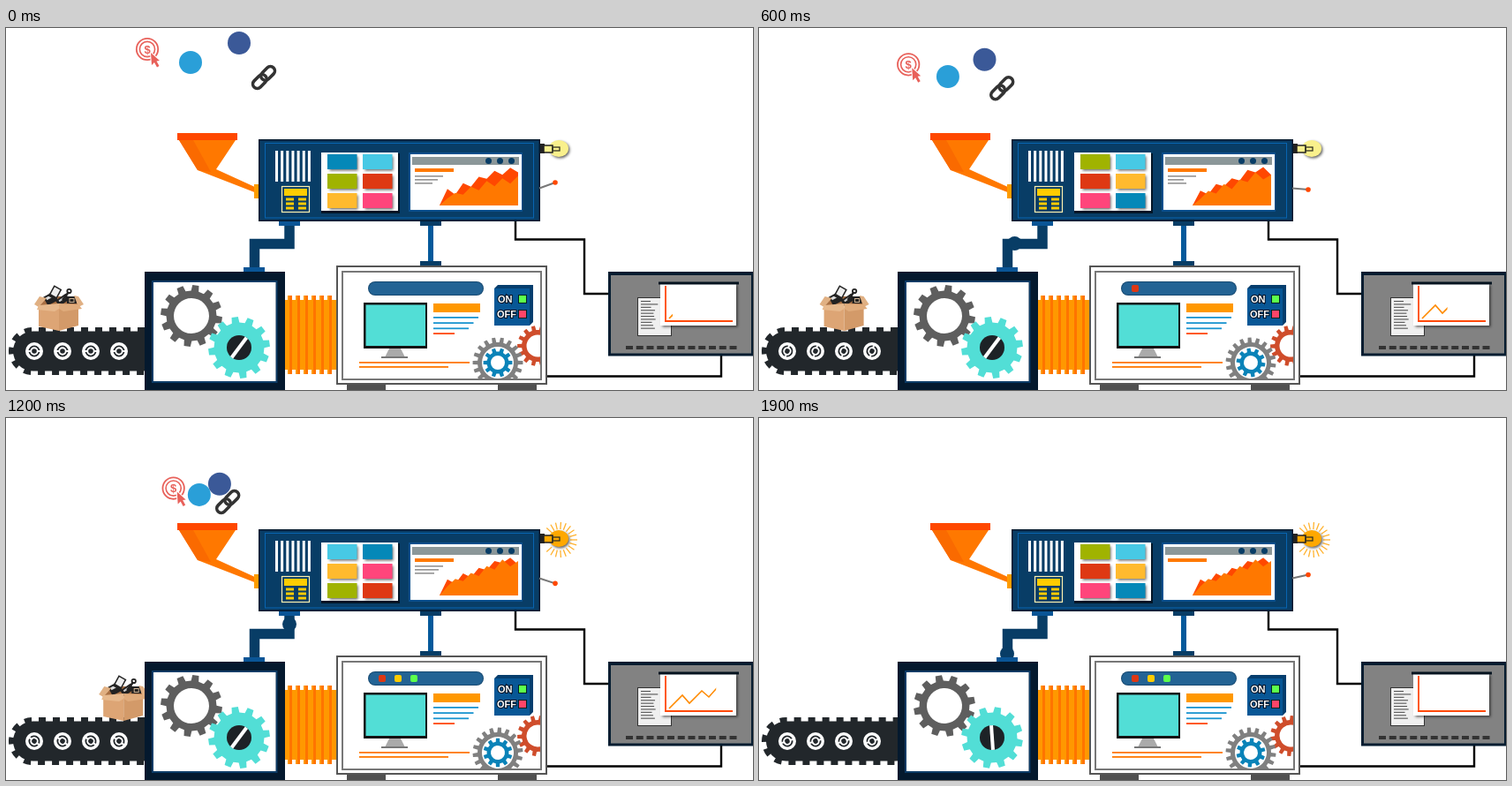
An HTML page with a canvas for the animation above (2 s loop, 846x410 px).

```html
<!DOCTYPE html>
<html lang="en">
<head>
<meta charset="utf-8">
<title>Content machine</title>
<style>
html, body { margin: 0; width: 100%; height: 100%; overflow: hidden; background: #fff; }
canvas { display: block; }
</style>
</head>
<body>
<canvas id="stage" width="846" height="410"></canvas>
<script>
const ctx = document.getElementById('stage').getContext('2d');
const NAVY = '#04192e', BLUE = '#083d66', ORANGE = '#ff7800', RED = '#ff4800';

// Drawing helpers
function rect(x, y, w, h, color) {
  ctx.fillStyle = color;
  ctx.fillRect(x, y, w, h);
}
function frame(x, y, w, h, color, width) {
  ctx.strokeStyle = color;
  ctx.lineWidth = width;
  ctx.strokeRect(x, y, w, h);
}
function pill(x, y, w, h, r, color) {
  ctx.fillStyle = color;
  ctx.beginPath();
  ctx.roundRect(x, y, w, h, r);
  ctx.fill();
}
function disc(x, y, r, color) {
  ctx.fillStyle = color;
  ctx.beginPath();
  ctx.arc(x, y, r, 0, 7);
  ctx.fill();
}
function ring(x, y, r, color, width) {
  ctx.strokeStyle = color;
  ctx.lineWidth = width;
  ctx.beginPath();
  ctx.arc(x, y, r, 0, 7);
  ctx.stroke();
}
function trace(points) {
  ctx.beginPath();
  points.forEach(([x, y]) => ctx.lineTo(x, y));
}
function poly(points, color) {
  trace(points);
  ctx.fillStyle = color;
  ctx.fill();
}
function line(points, color, width) {
  trace(points);
  ctx.strokeStyle = color;
  ctx.lineWidth = width;
  ctx.stroke();
}
function at(x, y, angle, draw) {
  ctx.save();
  ctx.translate(x, y);
  ctx.rotate(angle);
  draw();
  ctx.restore();
}
function clipped(x, y, w, h, draw) {
  ctx.save();
  ctx.beginPath();
  ctx.rect(x, y, w, h);
  ctx.clip();
  draw();
  ctx.restore();
}
function shadowed(draw) {
  ctx.save();
  ctx.shadowColor = 'rgba(0,0,0,.6)';
  ctx.shadowBlur = 3;
  ctx.shadowOffsetX = ctx.shadowOffsetY = 1.5;
  draw();
  ctx.restore();
}
function gear(x, y, outer, root, hole, teeth, angle, color) {
  at(x, y, angle, () => {
    const pitch = 2 * Math.PI / teeth;
    ctx.beginPath();
    for (let i = 0; i < teeth; i++) {
      [[-.29, root], [-.2, outer], [.2, outer], [.29, root]].forEach(([k, r]) => {
        const a = (i + k) * pitch;
        ctx.lineTo(r * Math.cos(a), r * Math.sin(a));
      });
    }
    ctx.closePath();
    if (hole) {
      ctx.moveTo(hole, 0);
      ctx.arc(0, 0, hole, 0, 7);
    }
    ctx.fillStyle = color;
    ctx.fill('evenodd');
  });
}
function noise(seed) {
  const v = Math.sin(seed * 12.9898) * 43758.5453;
  return v - Math.floor(v);
}

// Falling icons: position = start + v * n + a * n²
const fall = (start, v, a, n) => start + v * n + a * n * n;

function clickIcon(x, y) {
  const red = '#e8615a';
  ring(x, y, 12.2, red, 1.8);
  ring(x, y, 8.6, red, 1.6);
  ctx.fillStyle = red;
  ctx.font = 'bold 13px "Liberation Sans", Arial, sans-serif';
  ctx.textAlign = 'center';
  ctx.fillText('$', x, y + 4.7);
  ctx.textAlign = 'left';
  const cursor = [[4, 4], [14, 13], [10.5, 13.5], [13.5, 19], [11, 20.5], [8, 15], [5, 18]]
    .map(([dx, dy]) => [x + dx, y + dy]);
  line([...cursor, cursor[0]], '#fff', 2);
  poly(cursor, red);
}
function linkIcon(x, y) {
  at(x, y, -Math.PI / 4, () => {
    ctx.strokeStyle = '#333';
    ctx.lineWidth = 3.6;
    [-15.5, -2.5].forEach(left => {
      ctx.beginPath();
      ctx.roundRect(left, -5, 18, 10, 5);
      ctx.stroke();
    });
  });
}
function icons(n) {
  clipped(0, 0, 846, 120, () => {
    disc(fall(264, -1, -.07, n), fall(17, 1.45, .28, n), 13, '#3b5998');
    disc(fall(209, .82, 0, n), fall(39, 1.35, .22, n), 13, '#2a9fd8');
    clickIcon(fall(160, .6, .156, n), fall(24, 1.15, .29, n));
    linkIcon(fall(292, -2.2, -.1, n), fall(56, .85, .2, n));
  });
}

function hopper() {
  poly([[196, 127], [260, 127], [238, 160], [284, 181], [284, 187], [217, 161]], ORANGE);
  poly([[196, 127], [212, 127], [232, 163], [217, 161]], '#fa6a00');
  rect(194, 119, 68, 8, RED);
  rect(281, 177, 5, 16, '#ff9c00');
}

function bulb(n) {
  const lit = (n + 6.25) % 7.5 < 3.75;
  const glass = lit ? '#ffa800' : '#f9f08c';
  if (lit) {
    for (let a = -2.4; a < 2.5; a += .3) {
      line([12, 20].map(r => [627 + r * Math.cos(a), 138 + r * Math.sin(a)]), '#ffb22e', 1.3);
    }
  }
  shadowed(() => {
    ctx.fillStyle = glass;
    ctx.beginPath();
    ctx.ellipse(626, 136.5, 11, 9.5, 0, 0, 7);
    ctx.fill();
  });
  rect(605, 131, 5, 11, '#222');
  rect(609, 133, 10, 8, glass);
  frame(609, 133, 10, 8, '#222', 1.5);
  frame(619, 135, 8, 4, '#332', 1.3);
}

const TILE_COLORS = { b: '#0588b8', c: '#47c9e5', o: '#a0b300', r: '#de3813', y: '#ffba2e', p: '#ff457b' };
const TILE_ORDERS = ['bcoryp', 'yrbpco', 'ocrypb', 'cbypor'];

function tiles(step) {
  rect(357, 142, 89, 68, '#021526');
  rect(357, 141, 87, 66, '#fff');
  const order = TILE_ORDERS['0120312'[step]];
  [...order].forEach((key, i) => shadowed(() =>
    rect(364 + i % 2 * 40, 143 + (i >> 1) * 22, 33.5, 17, TILE_COLORS[key])));
}

function mountain(height, shape, phase, color) {
  const points = [[491, 201]];
  for (let i = 1; i < 11; i++) {
    const t = i / 10;
    const zigzag = (i + phase) % 2 ? 3.5 : -3.5;
    const rise = height * Math.min(1, .25 + t) + zigzag + 4 * noise(shape * 11 + i) - 2;
    points.push([491 + 89 * t, 201 - rise]);
  }
  poly([...points, [580, 201]], color);
}

function areaChart(n, step) {
  const shape = Math.min(step, 4);
  rect(456, 141, 129, 67, '#0a4f8d');
  rect(458, 143, 126, 63, '#fff');
  rect(460, 146, 121, 9, '#8b9799');
  [546.5, 559.5, 572.5].forEach(x => disc(x, 150.5, 3.5, BLUE));
  rect(463, 159, 44, 4, ORANGE);
  for (let i = 0; i < 3 && n < 19; i++) {
    rect(463, 167 + i * 4, 32 - (i * 6 + shape * 4 * i) % 17, 1.7, '#999');
  }
  mountain(39, shape, 0, RED);
  mountain(28 + 2 * shape, shape, 1, ORANGE);
}

function upperMachine(n, step) {
  rect(286, 126, 319, 93, NAVY);
  rect(287.5, 127.5, 316, 90, BLUE);
  frame(293.5, 130.5, 304, 84.5, '#0864b0', 1);
  for (let i = 0; i < 7; i++) rect(305 + i * 6.15, 139, 3, 35, '#fff');
  frame(312.5, 179.5, 31, 29, '#fff0b0', 1.2);
  rect(315, 182, 26, 8, '#ffcc00');
  for (let i = 0; i < 6; i++) rect(317 + i % 2 * 14, 192.5 + (i >> 1) * 5, 9, 3, '#ffcc00');
  tiles(step);
  areaChart(n, step);
  const ballY = 181.5 - 6.5 * Math.cos(step * Math.PI / 3.5);
  line([[604, 181.5], [622, ballY]], '#777', 2);
  disc(622, ballY, 2.8, RED);
}

function pipes(n) {
  line([[577, 219], [577, 239.5], [655, 239.5], [655, 301], [683, 301]], '#000', 2.4);
  line([[612, 394.5], [810, 394.5], [810, 371]], '#000', 2.4);
  line([[321, 222], [321, 244.5], [281.5, 244.5], [281.5, 272]], BLUE, 11.5);
  const travel = n % 10 * 10.5 - 9.5;
  const x = 321 - Math.min(40, Math.max(0, travel - 22));
  const y = 222 + Math.min(travel, 22) + Math.max(0, travel - 62);
  clipped(270, 223, 64, 49, () => disc(x, y, 8, BLUE));
  rect(309, 219, 24, 5, '#0a5596');
  rect(269, 271, 24, 5, '#0a5596');
  rect(478, 223, 6, 42, '#05599b');
  rect(469, 219, 24, 5, BLUE);
  rect(469, 264, 24, 6, BLUE);
}

function carton(x) {
  at(x, 0, 0, () => {
    poly([[-22, 314], [-15, 304], [17, 304], [22, 314]], '#a86f43');
    at(-8, 304, -.5, () => { rect(-9, -4, 13, 11, '#222'); rect(-7, -2, 9, 3, '#ddd'); });
    at(-4, 299, .5, () => { rect(-5, -6, 10, 14, '#222'); rect(-3.5, -4.5, 7, 9, '#eee'); });
    at(4, 308, -.6, () => { rect(-7, -4, 14, 8, '#222'); rect(-4, -2, 8, 2, '#ccc'); });
    line([[4, 308], [11, 299]], '#222', 2.5);
    ring(11.5, 298, 2.2, '#222', 1.8);
    rect(9, 304, 11, 8, '#222');
    frame(12, 306.5, 5, 4, '#ccb090', 1);
    poly([[-23, 314], [0, 317], [0, 343], [-23, 338]], '#dda575');
    poly([[0, 317], [22, 313], [22, 337], [0, 343]], '#d39a69');
    poly([[-22, 304], [-14, 306], [-23, 316], [-28, 313]], '#e0b083');
    poly([[17, 303], [22, 304], [28, 313], [22, 316]], '#e0b083');
    poly([[-23, 314], [0, 312], [0, 318], [-5, 321], [-25, 319]], '#e7b98d');
    poly([[0, 312], [22, 313], [26, 318], [5, 321], [0, 318]], '#e0ac7c');
  });
}

function conveyor(n) {
  const dark = '#22272b';
  pill(8, 343.5, 170, 45, 22.5, dark);
  ctx.save();
  ctx.strokeStyle = dark;
  ctx.lineWidth = 6;
  ctx.setLineDash([8, 8]);
  ctx.lineDashOffset = n * 8 / 3;
  ctx.beginPath();
  ctx.moveTo(157, 342);
  ctx.arc(30, 366, 24, -Math.PI / 2, Math.PI / 2, true);
  ctx.lineTo(157, 390);
  ctx.stroke();
  ctx.restore();
  for (let x = 32; x < 150; x += 32) {
    disc(x, 366, 10, '#fff');
    at(x, 366, n * Math.PI / 10, () => {
      ring(0, 0, 5.6, dark, 1.8);
      disc(0, 0, 2.8, dark);
      line([[-7, 0], [-4, 0]], '#fff', 2);
      line([[4, 0], [7, 0]], '#fff', 2);
    });
  }
}

function gearMachine(n) {
  const turn = (127 - 41 * (n % 6)) * Math.PI / 180;
  const halfTooth = Math.PI / 12;
  rect(157, 276, 159, 134, NAVY);
  frame(166, 287, 140.5, 114, '#0c3b66', 2);
  rect(167, 288, 138.5, 112, '#fff');
  gear(210, 326, 35, 28.5, 20, 12, halfTooth - turn, '#5e5e5e');
  gear(264, 362, 35, 28.5, 0, 12, halfTooth + turn, '#52ded6');
  disc(264, 362, 14, '#1d2226');
  at(264, 362, turn, () => rect(-14, -2, 28, 4, '#fff'));
}

function bellows() {
  rect(316, 308, 58, 79, '#ff9800');
  for (let x = 319; x < 372; x += 9) {
    rect(x, 303, 5, 89, '#ff9800');
    rect(x + 2, 303, 3, 89, '#ff7400');
  }
}

function monitor() {
  poly([[434, 363], [447, 363], [452, 373], [429, 373]], '#aaa');
  rect(425, 372, 30, 2, '#777');
  rect(405, 311, 72, 52, '#111');
  rect(407.5, 313.5, 67.5, 46.5, '#52ded6');
}

function switchBox() {
  poly([[553, 295], [557, 291], [597, 291], [597, 333], [593, 337], [553, 337]], '#063e6e');
  rect(553, 295, 40, 42, '#085796');
  ctx.font = 'bold 11px "Liberation Sans", Arial, sans-serif';
  ctx.lineWidth = 2;
  ctx.strokeStyle = '#012';
  [['ON', 557, '#5cff4c'], ['OFF', 556, '#ff4568']].forEach(([label, x, color], i) => {
    const y = 311 + i * 17;
    ctx.strokeText(label, x, y);
    ctx.fillStyle = '#fff';
    ctx.fillText(label, x, y);
    rect(580, y - 9, 10, 10, '#022');
    rect(581, y - 8, 8, 8, color);
  });
}

function screenMachine(n, step) {
  rect(386, 403, 44, 7, '#505050');
  rect(557, 403, 44, 7, '#505050');
  rect(374, 269, 239, 135, '#555');
  rect(376, 271, 235, 131, '#fff');
  frame(381, 276, 225, 122, '#777', 2);
  pill(410, 287, 131, 16, 8, '#174a72');
  pill(411, 288, 129, 14, 7, '#236394');
  ['#de3813', '#ffcc00', '#5cff4c'].forEach((color, i) => {
    if (step >= i + 2) pill(422 + i * 18, 291, 8, 8, 2, color);
  });
  monitor();
  rect(484, 312, 53, 10, '#ff9800');
  for (let i = 0; i < 3; i++) rect(484, 327 + i * 6.2, 51 - i * 5.5, 1.8, '#1a94d0');
  rect(484, 345.2, 24, 1.8, RED);
  rect(400, 378, 125, 1.8, ORANGE);
  rect(400, 383, 101, 1.8, ORANGE);
  switchBox();
  clipped(382, 277, 223, 120, () => {
    const turn = n * Math.PI / 40;
    gear(602, 360, 23, 18, 12.5, 14, -turn, '#cf4d2b');
    gear(557, 379, 28.5, 23, 18, 18, turn, '#808080');
    gear(557, 379, 16.5, 12.5, 8, 10, -turn, '#0a83b8');
  });
}

const TREND = [[751, 329], [766, 314], [774, 323], [788, 309], [796, 316], [812, 298]];

function plotter(n, step) {
  rect(682, 276, 164, 95.5, '#041c30');
  rect(685, 280, 159, 88.5, '#828282');
  frame(715.5, 305.5, 38, 43, '#333', 1);
  rect(716, 306, 37, 42, '#efefef');
  for (let i = 0; i < 10; i++) rect(719, 309 + i * 3.4, 11 + 9 * noise(i), 1.1, '#555');
  shadowed(() => rect(741, 289, 86, 48, '#fff'));
  rect(739, 287.5, 91, 3, '#03131f');
  line([[747, 292], [747, 333]], RED, 1.8);
  line([[746, 332], [823, 332]], RED, 1.8);
  if (n < 19) {
    clipped(745, 290, 10 + 4.1 * n, 45, () => line(TREND, '#ff8a00', 1.6));
  }
  if (step % 2 === 0) {
    for (let i = 0; i < 11; i++) rect(702 + i * 11.75, 360, 8, 4, '#333');
  }
}

function draw() {
  const n = Math.floor(performance.now() / 100) % 20;
  const step = Math.floor(n / 3);
  rect(0, 0, 846, 410, '#fff');
  icons(n);
  hopper();
  bulb(n);
  pipes(n);
  upperMachine(n, step);
  conveyor(n);
  if (n < 19) carton(60 + 6.1 * n);
  bellows();
  gearMachine(n);
  screenMachine(n, step);
  plotter(n, step);
  requestAnimationFrame(draw);
}
draw();
</script>
</body>
</html>
```
